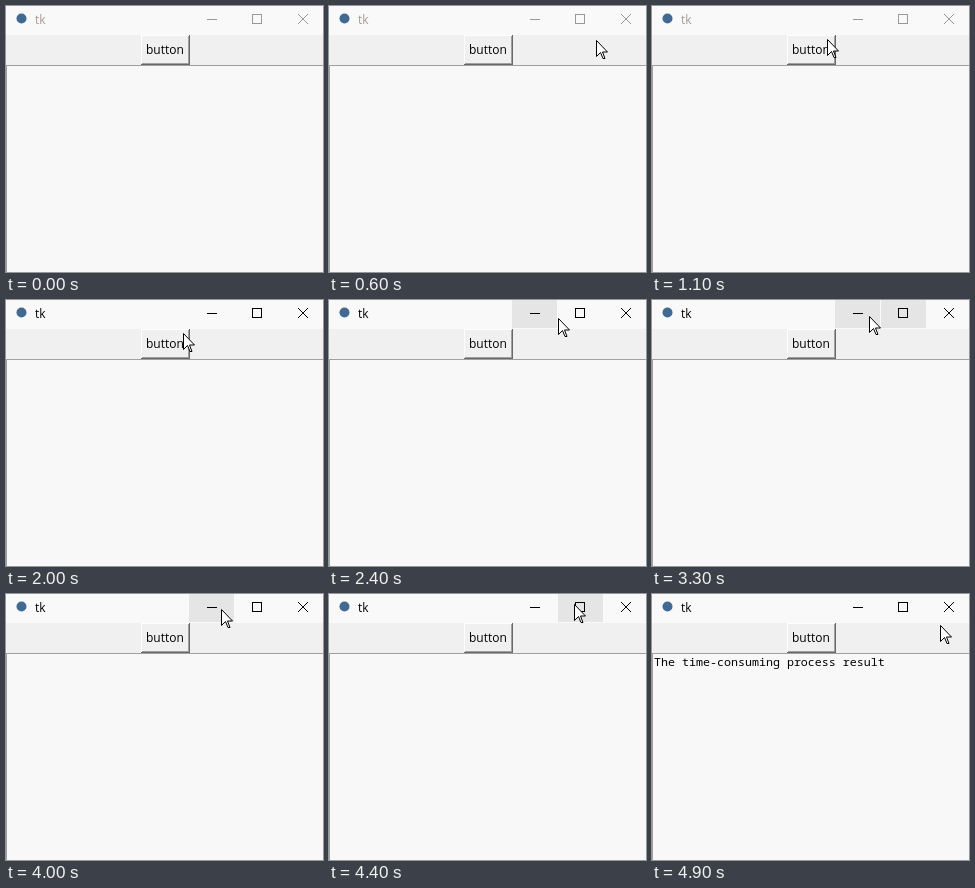
These frames come from a looping animation (317x266 px, 9.3 s). An HTML page with a canvas:

```html
<!DOCTYPE html>
<html lang="en">
<head>
<meta charset="utf-8">
<title>tk</title>
<style>
  html, body { margin: 0; width: 100%; height: 100%; overflow: hidden; background: #f8f8f8; }
  canvas { display: block; }
</style>
</head>
<body>
<canvas id="stage" width="317" height="266"></canvas>
<script>
const ctx = document.getElementById('stage').getContext('2d');
const WIDTH = 317, HEIGHT = 266;
const LOOP = 9300, STEP = 100;
const FOCUS_AT = 1700, RESULT_AT = 4700;
const UI_FONT = '500 12px "Open Sans", "Noto Sans", sans-serif';
const TEXT_FONT = '11.667px "Noto Sans Mono", monospace';
const arrow = new Path2D('M0 0V16L4 12L6.5 18H8.5L6 11.5H11Z');

// Places the pointer rests at; lift is how far it arcs upward on its way there
const stops = [
  { at: 300, x: 309, y: 43 },
  { at: 1100, x: 175, y: 33, lift: 7 },
  { at: 1400, x: 174, y: 34, hard: true },
  { at: 1900, x: 174, y: 34 },
  { at: 2900, x: 283, y: 23, lift: 11 },
  { at: 3620, x: 169, y: 49, lift: 23 },
  { at: 4000, x: 215, y: 15 },
  { at: 4900, x: 288, y: 31, lift: 12 }
];

const captionButtons = ['#e5e5e5', '#e5e5e5', '#e81123']
  .map((hover, i) => ({ x: 183 + 46 * i, width: 45, hover }));

const smooth = k => k * k * (3 - 2 * k);

function pointerAt(time) {
  if (time < stops[0].at) return null;
  const next = stops.findIndex(stop => stop.at > time);
  if (next < 0) return stops[stops.length - 1];
  const from = stops[next - 1], to = stops[next];
  const k = to.hard ? 0 : smooth((time - from.at) / (to.at - from.at));
  return {
    x: Math.round(from.x + (to.x - from.x) * k),
    y: Math.round(from.y + (to.y - from.y) * k - (to.lift || 0) * Math.sin(Math.PI * k))
  };
}

function isOver(button, time) {
  const p = pointerAt(time);
  return p && p.y < 28 && p.x > button.x && p.x < button.x + button.width;
}

function rect(color, x, y, width, height) {
  ctx.fillStyle = color;
  ctx.fillRect(x, y, width, height);
}

function label(text, x, y, color, font) {
  ctx.font = font;
  ctx.fillStyle = color;
  ctx.fillText(text, x, y);
}

function drawTitleBar(time) {
  const focused = time >= FOCUS_AT;
  const ink = focused ? '#000' : '#999';
  rect('#f9f9f9', 0, 0, WIDTH, 29);

  // A highlight lingers for one step after the pointer leaves
  const lit = captionButtons.map(b => isOver(b, time) || isOver(b, time - STEP));
  captionButtons.forEach((b, i) => {
    if (lit[i]) rect(b.hover, b.x, 0, b.width, 28);
  });

  ctx.fillStyle = '#416a93';
  ctx.beginPath();
  ctx.arc(15.5, 12.5, 5, 0, Math.PI * 2);
  ctx.fill();
  label('tk', 29, 18, focused ? '#000' : '#a39a98', UI_FONT);

  rect(ink, 201, 13, 10, 1);
  ctx.strokeStyle = ink;
  ctx.strokeRect(246.5, 8.5, 9, 9);
  ctx.strokeStyle = lit[2] ? '#fff' : ink;
  ctx.beginPath();
  ctx.moveTo(292, 8);
  ctx.lineTo(302, 18);
  ctx.moveTo(302, 8);
  ctx.lineTo(292, 18);
  ctx.stroke();
}

function drawContent(time) {
  rect('#f0f0f0', 0, 29, WIDTH, 30);
  rect('#696969', 135, 29, 49, 30);
  rect('#fff', 135, 29, 48, 29);
  rect('#a0a0a0', 136, 30, 47, 28);
  rect('#f0f0f0', 136, 30, 46, 27);
  label('button', 140, 48, '#000', UI_FONT);

  rect('#a0a0a0', 0, 59, WIDTH, HEIGHT - 59);
  rect('#f8f8f8', 1, 60, WIDTH - 1, HEIGHT - 60);
  if (time >= RESULT_AT) label('The time-consuming process result', 2, 72, '#000', TEXT_FONT);
}

function drawPointer(time) {
  const p = pointerAt(time);
  if (!p) return;
  ctx.save();
  ctx.translate(p.x + 0.5, p.y + 0.5);
  ctx.fillStyle = '#fff';
  ctx.strokeStyle = '#000';
  ctx.fill(arrow);
  ctx.stroke(arrow);
  ctx.restore();
}

function render() {
  const time = Math.floor((performance.now() % LOOP) / STEP) * STEP;
  drawTitleBar(time);
  drawContent(time);
  drawPointer(time);
  requestAnimationFrame(render);
}
render();
</script>
</body>
</html>
```
